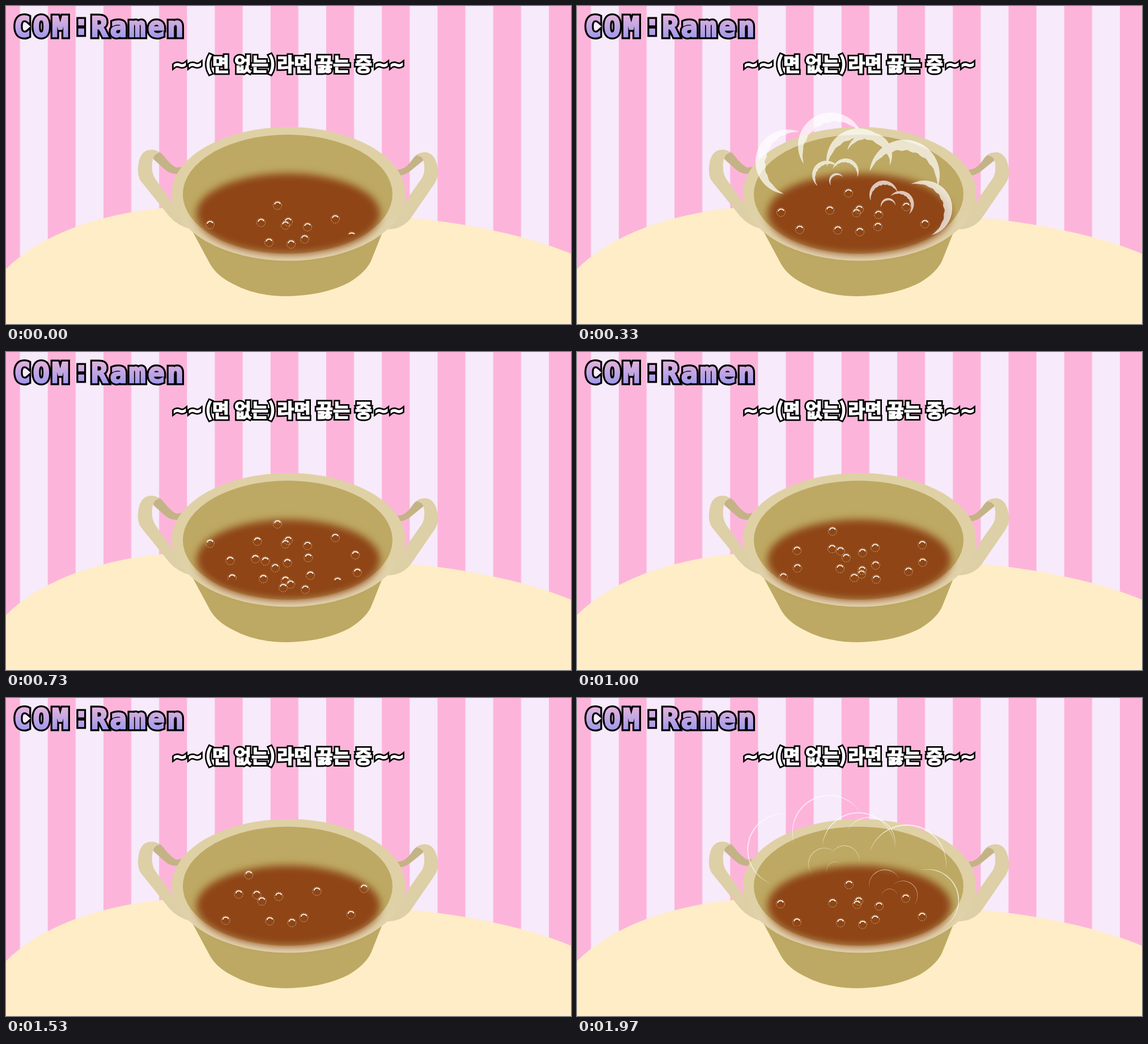
Animation of 997x561 px, one loop 2.01 s. Source, as an HTML page:

```html
<!DOCTYPE html>
<html lang="ko">
<head>
<meta charset="utf-8">
<title>Ramen pot</title>
<style>
  html, body { margin: 0; width: 100%; height: 100%; overflow: hidden; background: #f7eafa; }
  svg { display: block; width: 100vw; height: 100vh; }
  text { stroke-miterlimit: 3; }
  .title { font: bold 49px "DejaVu Sans Mono", monospace; letter-spacing: 4px; }
  .caption { font: bold 32.5px "Noto Sans CJK KR", "Noto Sans CJK", sans-serif; text-anchor: middle; }
  .wave { font: bold 32px "DejaVu Sans", sans-serif; text-anchor: middle; }
</style>
</head>
<body>
<svg viewBox="0 0 997 561" preserveAspectRatio="none">
  <defs>
    <linearGradient id="lilac" gradientUnits="userSpaceOnUse" x1="0" y1="17" x2="0" y2="56">
      <stop offset="0" stop-color="#e2b2dc"/>
      <stop offset="1" stop-color="#a099ea"/>
    </linearGradient>
    <linearGradient id="rim" x1="0" y1="0" x2="0" y2="1">
      <stop offset=".6" stop-color="#dfd1a5"/>
      <stop offset="1" stop-color="#e2d3b2"/>
    </linearGradient>
    <pattern id="stripes" patternUnits="userSpaceOnUse" x="-24.5" width="98.25" height="561">
      <rect width="98.25" height="561" fill="#f7eafa"/>
      <rect width="49.1" height="561" fill="#fdb4da"/>
    </pattern>
    <filter id="soft" x="-20%" y="-30%" width="140%" height="160%"><feGaussianBlur stdDeviation="7"/></filter>
    <clipPath id="surface"><rect width="997" height="402.5"/></clipPath>
    <g id="bubble" fill="none">
      <circle r="7.5" stroke="#ecd8a4" stroke-width=".9" stroke-dasharray="1.6 1.8"/>
      <path d="M-5 -1.5Q-4 -5.5 0 -5.5Q4 -5.5 5 -2.5" stroke="#fff" stroke-width="1.8"/>
    </g>
    <g id="heading" class="title">
      <text x="14" y="54">COM</text>
      <text x="118" y="50">:</text>
      <text x="150" y="54">Ramen</text>
    </g>
    <g id="subtitle">
      <text class="wave" x="320" y="114">~~</text>
      <text class="caption" x="413.5" y="115">(면 없는)</text>
      <text class="caption" x="562" y="115">라면 끓는 중</text>
      <text class="wave" x="676" y="114">~~</text>
    </g>
  </defs>

  <rect width="997" height="561" fill="url(#stripes)"/>
  <path fill="#feedc7" d="M0 464C60 405 160 366 290 355C440 342 600 355 713 374C800 381 920 404 997 437V561H0Z"/>

  <g fill="#c4b386">
    <path d="M261 258Q270 254 277 263Q290 280 300 285L312 284L302 296Q290 297 280 288L261 271Q257 265 261 258Z"/>
    <path d="M738 259Q727 258 719 268Q708 285 697 288L685 290L692 299Q705 299 716 289L737 272Z"/>
  </g>
  <g fill="#ddcfa6">
    <path d="M327 394Q303 388 288 371L238 309Q232 300 233 285Q235 257 252 254Q264 252 271 259Q260 260 258 276Q256 295 264 306L293 347L330 380Z"/>
    <path d="M670 394Q697 395 713 376L757 312Q764 300 762 288Q758 260 741 258Q731 257 724 264Q740 263 738 290Q738 300 728 312L700 352L670 380Z"/>
  </g>
  <path fill="#bda963" d="M325 390L360 455Q372 476 400 490Q440 512 495 512Q560 511 605 488Q638 468 646 445L664 400Z"/>
  <ellipse cx="498.5" cy="331.5" rx="206" ry="118" fill="url(#rim)"/>
  <ellipse cx="497" cy="332" rx="185" ry="105" fill="#bda963"/>
  <ellipse cx="498" cy="366.5" rx="162" ry="71" fill="#8f4512" filter="url(#soft)"/>

  <g id="bubbles"></g>
  <path id="steam" fill="#fff" fill-opacity=".7"/>

  <use href="#heading" stroke="#000" stroke-width="9"/>
  <use href="#heading" fill="url(#lilac)" stroke="url(#lilac)" stroke-width="2.5"/>
  <use href="#subtitle" stroke="#000" stroke-width="7"/>
  <use href="#subtitle" fill="#fff" stroke="#fff" stroke-width="1.6"/>
</svg>
<script>
const LOOP = 2010;
const SVG = "http://www.w3.org/2000/svg";
const bubbleLayer = document.getElementById("bubbles");
const steam = document.getElementById("steam");
const radians = degrees => degrees * Math.PI / 180;

// Every cluster has the same bubbles; some sway the other way and emerge late
const BUBBLES = [
  { x: 465, y: 0 }, { x: 451, y: -35 }, { x: 504, y: 3 },
  { x: 526, y: -6, mirrored: true },
  { x: 609, y: -11, mirrored: true, late: true },
  { x: 388, y: -1, mirrored: true, late: true }
];
const BOTTOM = 417;
const RISE = .066;
const SWAY_PERIOD = 950;
const LIFE = 1250;
const CLUSTERS = [
  { born: -460, drift: 28 },
  { born: 0, swing: -10, peak: 570 },
  { born: 470, swing: -26, peak: 0 },
  { born: 710, drift: 24, life: 390 },
  { born: 1170, swing: 29, peak: 800 },
  { born: 1660 }
];

// Steam arcs are half rings that face the tilt angle
const ring = (x, y, r, tilt) => ({ x, y, r, tilt });
function trio(x, y, turn) {
  const place = (distance, angle, r, tilt) => ring(
    x + distance * Math.cos(radians(angle + turn)),
    y + distance * Math.sin(radians(angle + turn)), r, tilt + turn * .7);
  return [place(0, 0, 25, 226), place(34.5, -10, 23, 288), place(20.5, 29, 13, 235)];
}
const RINGS = [
  ring(372, 275, 57, 194), ring(448, 246, 58, 243), ring(497, 273, 57, 266),
  ring(516, 263, 40, 290), ring(578, 298, 62, 283), ring(613, 357, 49, 338),
  ...trio(440, 298, 0), ...trio(541, 333, 38)
];
const STEAM_TIMES = [330, 1670];
const STEAM_SPAN = 340;
const STEAM_LEAD = .35;

function add(parent, tag, attrs = {}) {
  const node = document.createElementNS(SVG, tag);
  for (const key in attrs) node.setAttribute(key, attrs[key]);
  return parent.appendChild(node);
}

const groups = CLUSTERS.map(() => {
  const group = add(bubbleLayer, "g");
  const shapes = BUBBLES.map(({ late }) =>
    add(add(group, "g", late ? { "clip-path": "url(#surface)" } : {}), "use", { href: "#bubble" }));
  return { group, shapes };
});

function drawCluster({ born, drift = 0, swing = 0, peak = 0, life = LIFE }, { group, shapes }, t) {
  const age = t - born;
  const alive = age >= 0 && age < life;
  group.style.display = alive ? "" : "none";
  if (!alive) return;
  const wave = (1 + Math.cos(2 * Math.PI * (age - peak) / SWAY_PERIOD)) / 2;
  const sway = drift + swing * wave;
  const level = BOTTOM - RISE * age;
  BUBBLES.forEach(({ x, y, mirrored }, i) =>
    shapes[i].setAttribute("transform", `translate(${x + (mirrored ? -sway : sway)} ${level + y})`));
}

// Rings swell, spread from the pot centre and thin out; u is 0 when they are fully grown
function crescent({ x, y, r, tilt }, u) {
  const q = 1 - (1 - u) ** 2;
  const birth = Math.min(1, (u + STEAM_LEAD) / STEAM_LEAD);
  const radius = r * (1 + .12 * q) * (.5 + .5 * birth * (2 - birth));
  const width = r * .31 * (1 - q * .9);
  const cx = x + (x - 505) * .06 * q;
  const cy = y + (y - 360) * .09 * q;
  const half = 97 - 12 * q;
  const steps = 30;
  const outer = [], inner = [];
  for (let i = 0; i <= steps; i++) {
    const s = i / steps;
    const angle = radians(tilt + half * (2 * s - 1));
    const depth = width * Math.sin(Math.PI * s) ** .85 * (1 + .07 * Math.sin(i * 1.7 + x));
    const point = d => `${(cx + d * Math.cos(angle)).toFixed(1)} ${(cy + d * Math.sin(angle)).toFixed(1)}`;
    outer.push(point(radius));
    inner.unshift(point(radius - depth));
  }
  return `M${outer.concat(inner).join("L")}Z`;
}

function render(t) {
  CLUSTERS.forEach((cluster, i) => drawCluster(cluster, groups[i], t));
  const u = STEAM_TIMES.map(time => (t - time) / STEAM_SPAN).find(v => v > -STEAM_LEAD && v < 1);
  steam.setAttribute("d", u === undefined ? "" : RINGS.map(puff => crescent(puff, u)).join(""));
}

const began = performance.now();
function tick() {
  render((performance.now() - began) % LOOP);
  requestAnimationFrame(tick);
}
render(0);
requestAnimationFrame(tick);
</script>
</body>
</html>
```
